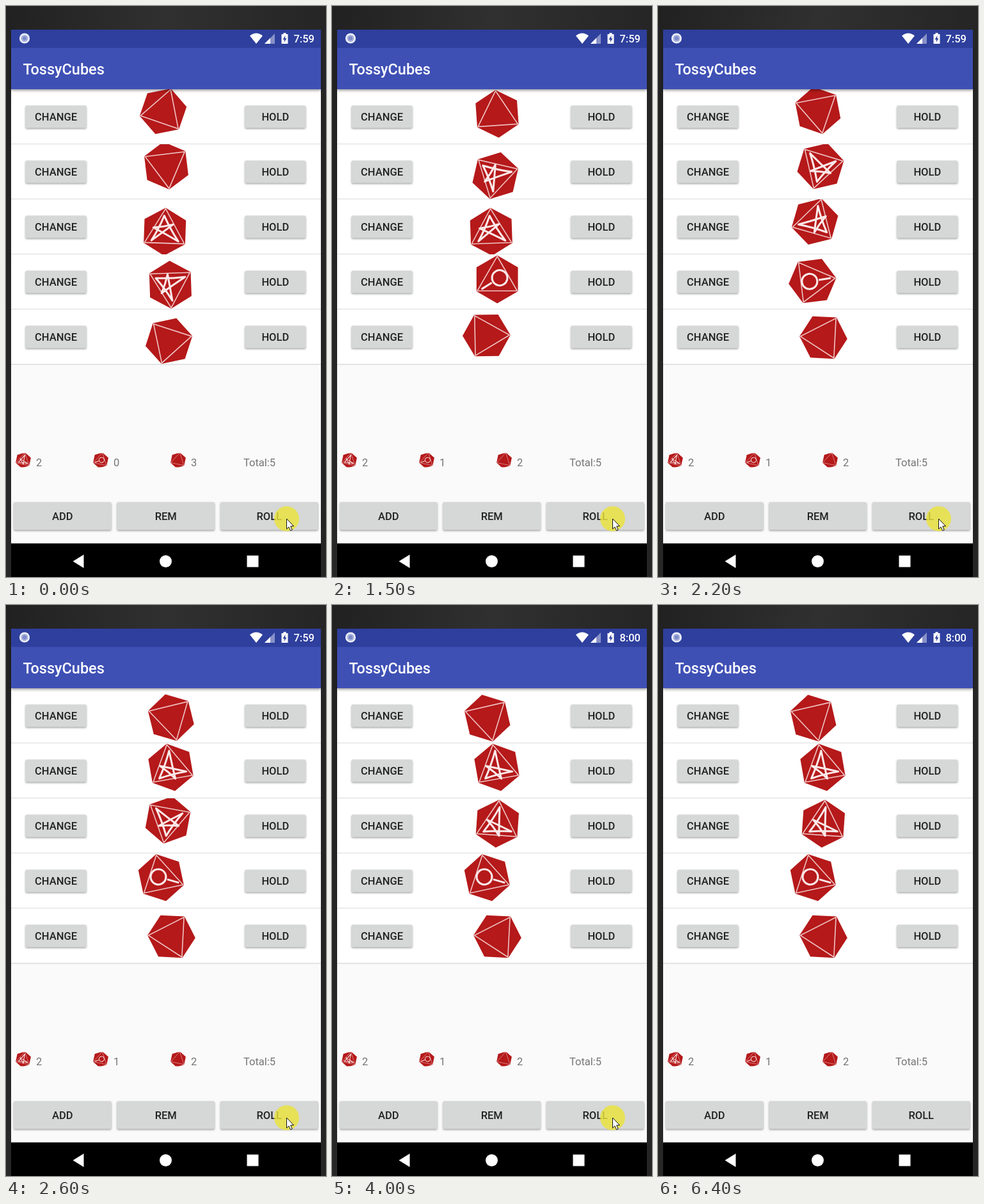
An HTML page with a canvas that plays this animation: 500 by 892 pixels, repeating every 6500 ms.

```html
<!DOCTYPE html>
<html lang="en">
<head>
<meta charset="utf-8">
<title>TossyCubes</title>
<style>
html, body { margin: 0; width: 100%; height: 100%; overflow: hidden; background: #222; }
canvas { display: block; }
</style>
</head>
<body>
<canvas id="stage" width="500" height="892"></canvas>
<script>
const g = document.getElementById('stage').getContext('2d');
const LOOP = 6500, STEP = 100, PRESS = 800, ROLL = 850;
const RED = '#b5191a', INK = '#222';
const KEY_TIMES = [1000, 1500, 2200, 3000];

// turns: degrees still to go at each key time; the rest is covered by `stop`
const dice = [
  { faces: ['blank', 'blank'], from: 169, to: 77, turns: [877, 531, 238, 43], stop: 3700 },
  { faces: ['blank', 'star'], from: 203, to: -100, turns: [677, 277, 33], stop: 2600 },
  { faces: ['star', 'star'], from: 32, to: -86, turns: [407, 246, 108, 18], stop: 3700 },
  { faces: ['star', 'glass'], from: -32, to: 138, turns: [568, 228, 25], stop: 2600 },
  { faces: ['blank', 'blank'], from: -12, to: -57, turns: [571, 184], stop: 2200 }
];

const rad = deg => deg * Math.PI / 180;
const polar = (r, deg) => [r * Math.cos(rad(deg)), r * Math.sin(rad(deg))];

function rect(x, y, w, h, fill) {
  g.fillStyle = fill;
  g.fillRect(x, y, w, h);
}

function poly(points, fill, stroke, width) {
  g.beginPath();
  points.forEach(p => g.lineTo(p[0], p[1]));
  g.closePath();
  if (fill) { g.fillStyle = fill; g.fill(); }
  if (stroke) { g.strokeStyle = stroke; g.lineWidth = width; g.stroke(); }
}

function circle(x, y, r, fill, stroke, width) {
  g.beginPath();
  g.arc(x, y, r, 0, 7);
  if (fill) { g.fillStyle = fill; g.fill(); }
  if (stroke) { g.strokeStyle = stroke; g.lineWidth = width; g.stroke(); }
}

function text(str, x, y, { size = 16.5, weight = 500, color = INK, align = 'left' } = {}) {
  g.font = `${weight} ${size}px Roboto, sans-serif`;
  g.fillStyle = color;
  g.textAlign = align;
  g.fillText(str, x, y);
}

function shadow(color, blur, dy) {
  g.shadowColor = color;
  g.shadowBlur = blur;
  g.shadowOffsetY = dy;
}

function clipTo(x, y, w, h) {
  g.beginPath();
  g.rect(x, y, w, h);
  g.clip();
}

function button(label, x, y, w, h) {
  g.save();
  shadow('rgba(0,0,0,.35)', 3, 1.5);
  g.fillStyle = '#d6d7d7';
  g.beginPath();
  g.roundRect(x, y, w, h, 2);
  g.fill();
  g.restore();
  text(label, x + w / 2, y + h / 2 + 6, { align: 'center' });
}

// Three long tips towards the triangle's corners and two short ones
function drawStar() {
  const tips = [polar(26, 4), polar(25, 115), polar(19, 168), polar(25, 236), polar(17, 287)];
  g.beginPath();
  g.moveTo(...tips[0]);
  for (let i = 1; i <= 5; i++) {
    const p = tips[(i - 1) * 2 % 5], q = tips[i * 2 % 5];
    g.quadraticCurveTo((p[0] + q[0]) * .42, (p[1] + q[1]) * .42, q[0], q[1]);
  }
  g.closePath();
  g.stroke();
}

function drawGlass() {
  g.rotate(rad(-122));
  circle(-4.5, 0, 12, null, '#fbeaea', 3);
  g.beginPath();
  g.moveTo(10, 0);
  g.lineTo(29, 0);
  g.stroke();
}

function drawDie(x, y, angle, face, scale = 1) {
  g.save();
  g.translate(x, y);
  g.rotate(rad(angle));
  g.scale(scale, scale);
  poly([0, 60, 120, 180, 240, 300].map(a => polar(37.4, a)), RED);
  poly([0, 120, 240].map(a => polar(36, a)), null, '#f0c4c4', 1.6);
  g.strokeStyle = '#fbeaea';
  g.lineWidth = 3;
  g.lineJoin = 'round';
  if (face === 'star') drawStar();
  if (face === 'glass') drawGlass();
  g.restore();
}

// Decelerating spin: the square root of the remaining turn falls linearly
function dieAngle(die, t) {
  if (t < ROLL) return die.from;
  if (t >= die.stop) return die.to;
  const times = [...KEY_TIMES.slice(0, die.turns.length), die.stop];
  const roots = [...die.turns, 0].map(Math.sqrt);
  let i = 0;
  while (t >= times[i + 1]) i++;
  const k = (t - times[i]) / (times[i + 1] - times[i]);
  return die.to - (roots[i] + (roots[i + 1] - roots[i]) * k) ** 2;
}

function drawRows(t) {
  dice.forEach((die, i) => {
    const y = 130 + i * 86;
    rect(8, y, 484, 85, '#fff');
    rect(8, y + 85, 484, 1.5, '#dcdcdc');
    button('CHANGE', 30.5, y + 25.5, 95, 35);
    button('HOLD', 373.3, y + 25.5, 95, 35);
    // The die sits off the pivot, so turning also carries it around
    const angle = dieAngle(die, t), [dx, dy] = polar(8.7, angle + 70);
    g.save();
    clipTo(200, y, 100, 86);
    drawDie(250 + dx, y + 42 + dy, angle, die.faces[+(t >= ROLL)]);
    g.restore();
  });
}

function drawBars(t) {
  g.save();
  shadow('rgba(0,0,0,.4)', 4, 2);
  rect(8, 65, 484, 65, '#3f50b5');
  g.restore();
  rect(8, 37, 484, 28.5, '#2e3f9d');
  text('TossyCubes', 26.5, 107, { size: 23.5, color: '#fff' });

  circle(29, 50.5, 6.8, '#aab3dd', '#eceffa', 2.6);
  circle(29, 50.5, 3.2, '#7f8cc9');
  g.beginPath();
  g.moveTo(391, 59);
  g.lineTo(381, 46.5);
  g.quadraticCurveTo(391, 38.5, 401, 46.5);
  g.fillStyle = '#fff';
  g.fill();
  poly([[404, 59], [420, 59], [420, 43]], '#8791c8');
  poly([[404, 59], [413, 59], [413, 50]], '#fff');
  rect(430.5, 44, 10, 15, '#fff');
  rect(433.5, 42, 4, 2, '#fff');
  poly([[436.5, 46], [432.5, 52.5], [435, 52.5], [434.5, 57], [438.5, 50.5], [436, 50.5]], '#2e3f9d');
  text(t < 2900 ? '7:59' : '8:00', 482, 57, { color: '#fff', align: 'right' });

  rect(8, 839.5, 484, 53, '#000');
  poly([[104.5, 867.5], [121.5, 857], [121.5, 878]], '#fff');
  circle(249.5, 867.5, 9.5, '#fff');
  rect(376.5, 858.5, 18, 18, '#fff');
}

function drawCounters(t) {
  const counts = t < ROLL ? [2, 0, 3] : [2, 1, 2];
  const style = { weight: 400, color: '#757575' };
  ['star', 'glass', 'blank'].forEach((face, i) => {
    g.save();
    clipTo(i * 121, 698.5, 60, 22);
    drawDie(27 + i * 121, 709.7, -78, face, .335);
    g.restore();
    text(counts[i], 47 + i * 121, 719, style);
  });
  text('Total:5', 371, 719, style);
}

function drawRipple(t) {
  if (t < PRESS || t >= 1400) return;
  const fade = Math.min(1, (1400 - t) / 300);
  g.save();
  clipTo(335, 775, 152.5, 44);
  rect(335, 775, 153, 44, `rgba(0,0,0,${.05 * fade})`);
  circle(440, 800, (t - PRESS) * .465, `rgba(0,0,0,${.06 * fade})`);
  g.restore();
}

function drawPointer(t) {
  if (t >= 5200) return;
  circle(438.5, 801, 19.5, 'rgba(234,228,56,.8)');
  if (t >= PRESS && t < 1200) {
    circle(438, 800, 17, null, 'rgba(150,145,20,.6)', 2);
    circle(438, 800, 3.5, null, 'rgba(150,145,20,.6)', 1.5);
  }
  poly([[438.5, 801], [438.5, 817], [442, 813.8], [444.6, 819.6], [447.2, 818.4],
    [444.7, 812.8], [449.5, 812.5]], '#fff', '#111', 1);
}

function draw(t) {
  const backdrop = g.createLinearGradient(0, 0, 500, 60);
  backdrop.addColorStop(0, '#212121');
  backdrop.addColorStop(.5, '#303030');
  backdrop.addColorStop(1, '#252525');
  rect(0, 0, 500, 892, backdrop);
  rect(8, 130, 484, 710, '#fafafa');
  drawRows(t);
  drawBars(t);
  drawCounters(t);
  ['ADD', 'REM', 'ROLL'].forEach((label, i) => button(label, 12 + i * 161.5, 775, 152.5, 43.5));
  drawRipple(t);
  drawPointer(t);
}

function frame(now) {
  draw(Math.floor(now % LOOP / STEP) * STEP);
  requestAnimationFrame(frame);
}
requestAnimationFrame(frame);
</script>
</body>
</html>
```
